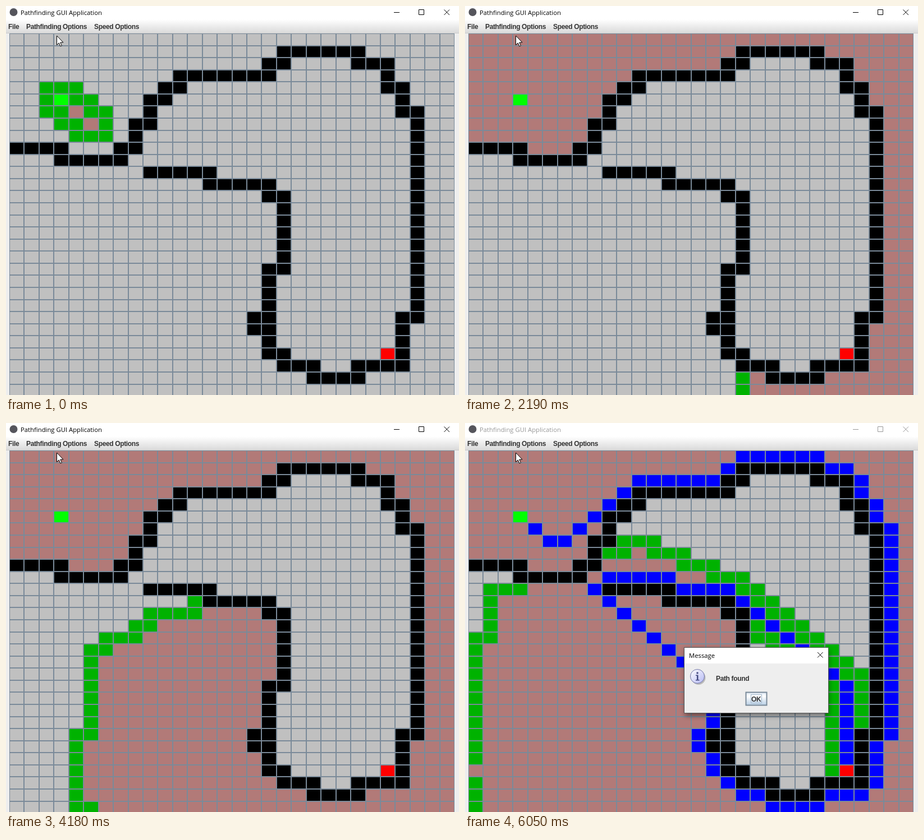
Animation of 807 by 694 pixels, one loop 6520 ms. Source, as an HTML page:

```html
<!DOCTYPE html>
<html lang="en">
<head>
<meta charset="utf-8">
<title>Pathfinding GUI Application</title>
<style>
html, body { margin: 0; width: 100%; height: 100%; overflow: hidden; background: #eee; }
svg { display: block; }
.caption { font: 11.3px "Open Sans", sans-serif; }
.label { font: bold 12px "Liberation Sans", Arial, sans-serif; letter-spacing: -.35px; fill: #333; }
.line { fill: none; stroke: currentColor; }
</style>
</head>
<body>
<svg width="807" height="694" viewBox="0 0 807 694">
  <defs>
    <linearGradient id="bar" x2="0" y2="1"><stop stop-color="#fff"/><stop offset="1" stop-color="#dadada"/></linearGradient>
    <linearGradient id="button" x2="0" y2="1"><stop stop-color="#dde8f3"/><stop offset=".3" stop-color="#fff"/><stop offset="1" stop-color="#b8cfe5"/></linearGradient>
    <linearGradient id="info" x2="1" y2="1"><stop stop-color="#fff"/><stop offset="1" stop-color="#b4b8f4"/></linearGradient>
    <filter id="soft" x="-20%" y="-20%" width="140%" height="150%"><feGaussianBlur stdDeviation="5"/></filter>
  </defs>

  <rect width="807" height="24" fill="#fff"/>
  <circle cx="13.500" cy="11" r="7" fill="#55555c"/>
  <g id="titlebar" color="#000">
    <text class="caption" x="26" y="16" fill="currentColor">Pathfinding GUI Application</text>
    <path class="line" d="M691 11.500h10M735.500 6.500h9v9h-9zM780.500 6.500l9.500 9.500m0-9.500l-9.500 9.500"/>
  </g>
  <rect y="24" width="807" height="24" fill="url(#bar)"/>
  <rect y="48" width="807" height="1" fill="#ccc"/>
  <g class="label">
    <text x="4" y="41">File</text>
    <text x="36" y="41">Pathfinding Options</text>
    <text x="157" y="41">Speed Options</text>
  </g>

  <rect x="6" y="49" width="793" height="645" fill="#7a8a99"/>
  <g id="grid" shape-rendering="crispEdges"></g>
  <path d="M90.500 53v16.500l3.800-3.600 2.600 6 2.500-1.100-2.600-5.800h5.200z" fill="#fff" stroke="#000"/>

  <g id="dialog" opacity="0">
    <rect x="392" y="404" width="256" height="118" opacity=".45" filter="url(#soft)"/>
    <rect x="390.500" y="400.500" width="257" height="117" fill="#eee" stroke="#555"/>
    <rect x="391" y="401" width="256" height="28" fill="#fff"/>
    <text class="caption" x="399" y="419">Message</text>
    <path class="line" d="M628 409l9.500 9.500m0-9.500l-9.500 9.500"/>
    <circle cx="416" cy="454.500" r="12.500" fill="#999" opacity=".6"/>
    <circle cx="414" cy="452" r="12.500" fill="url(#info)" stroke="#7377a8"/>
    <path d="M411 449.500h4.500v8.500h2v1.500h-6.500v-1.500h2v-7h-2zM412.500 444.500h3v3h-3z" fill="#444a80"/>
    <text class="label" x="447" y="459.500">Path found</text>
    <rect x="500.500" y="480.500" width="37" height="23" fill="url(#button)" stroke="#7a8a99" stroke-width="2"/>
    <rect x="509.500" y="484.500" width="19" height="15" fill="none" stroke="#a3b8cc"/>
    <text class="label" x="510" y="497">OK</text>
  </g>
</svg>
<script>
const SIZE = 30, LOOP = 6520, FOUND = 5740;
const START = 5 * SIZE + 3, GOAL = 26 * SIZE + 25;
const COLOR = { free: '#c0c0c0', wall: '#000', open: '#00b200', closed: '#b27a78', path: '#00f', start: '#0f0', goal: '#f00' };

// Wall column ranges, one entry per row
const WALLS = ['', '18-23', '17-18 23-25', '11-17 25', '10-11 25-26', '9-10 26', '9 26', '8-9', '8', '0-3 7-8',
  '3-7', '9-13', '13-17', '17-18', '18', '18', '18', '18', '18', '17-18', '17', '17', '17',
  '16-17 26', '16-17 26', '17 26', '17-18 26', '18-20 23-26', '20-23'];
const walls = new Set();
WALLS.forEach((row, r) => {
  if (r > 5 && r < 24) walls.add(r * SIZE + 27);
  for (const range of row.split(' ').filter(Boolean)) {
    const [a, b = a] = range.split('-').map(Number);
    for (let c = a; c <= b; c++) walls.add(r * SIZE + c);
  }
});

const col = i => i % SIZE, row = i => Math.floor(i / SIZE);
const toGoal = i => Math.hypot(col(i) - col(GOAL), row(i) - row(GOAL));

function neighbours(i) {
  const list = [];
  for (let dr = -1; dr <= 1; dr++) for (let dc = -1; dc <= 1; dc++) {
    const c = col(i) + dc, r = row(i) + dr, n = r * SIZE + c;
    if (n !== i && c >= 0 && r >= 0 && c < SIZE && r < SIZE && !walls.has(n)) list.push(n);
  }
  return list;
}

// A* with unit steps in eight directions; records the step at which each cell opens and closes
function search() {
  const cost = { [START]: 0 }, parent = {}, opened = {}, closed = {}, queue = [START];
  for (let step = 0; queue.length; step++) {
    let best = 0;
    const score = k => cost[queue[k]] + toGoal(queue[k]);
    for (let k = 1; k < queue.length; k++) if (score(k) < score(best)) best = k;
    const [cell] = queue.splice(best, 1);
    if (cell === GOAL) break;
    closed[cell] = step;
    for (const n of neighbours(cell)) {
      if (n in closed || cost[n] <= cost[cell] + 1) continue;
      if (!(n in cost)) {
        queue.push(n);
        opened[n] = step;
      }
      cost[n] = cost[cell] + 1;
      parent[n] = cell;
    }
  }
  const path = new Set();
  for (let i = parent[GOAL]; i !== undefined && i !== START; i = parent[i]) path.add(i);
  return { opened, closed, path };
}
const { opened, closed, path } = search();

const edgeX = c => Math.round(6 + 26.44 * c), edgeY = r => Math.round(49 + 21.57 * r);
const grid = document.getElementById('grid');
const cells = Array.from({ length: SIZE * SIZE }, (_, i) => {
  const rect = document.createElementNS('http://www.w3.org/2000/svg', 'rect');
  const x = edgeX(col(i)), y = edgeY(row(i));
  const box = { x: x + 1, y: y + 1, width: edgeX(col(i) + 1) - x - 2, height: edgeY(row(i) + 1) - y - 2 };
  for (const key in box) rect.setAttribute(key, box[key]);
  return grid.appendChild(rect);
});

// Repaint times: first, last, count
const times = [[0, 0, 1], [80, 710, 9], [790, 1410, 9], [1490, 2100, 9], [2190, 2820, 9], [2910, 3290, 6],
  [3370, 3540, 3], [3610, 4180, 8], [4240, 4240, 1], [4330, 4940, 9], [5020, 5500, 7], [5570, 5660, 2], [FOUND, 6050, 5]]
  .flatMap(([a, b, n]) => Array.from({ length: n }, (_, k) => n > 1 ? a + (b - a) * k / (n - 1) : a));

// Search progress: time, steps done
const PACE = [[0, 2], [1410, 135], [2190, 208], [3290, 312], [4180, 393], [5500, 518], [5660, 534], [LOOP, 534]];
function stepsAt(t) {
  const k = PACE.findIndex(p => p[0] > t);
  const [t0, n0] = PACE[k - 1], [t1, n1] = PACE[k];
  return Math.round(n0 + (n1 - n0) * (t - t0) / (t1 - t0));
}

function colorOf(i, step, done) {
  if (i === START) return COLOR.start;
  if (i === GOAL) return COLOR.goal;
  if (walls.has(i)) return COLOR.wall;
  if (done && path.has(i)) return COLOR.path;
  if (closed[i] <= step) return COLOR.closed;
  return opened[i] <= step ? COLOR.open : COLOR.free;
}

const titlebar = document.getElementById('titlebar'), dialog = document.getElementById('dialog');
function paint(t) {
  const done = t >= FOUND, step = stepsAt(t);
  cells.forEach((cell, i) => cell.setAttribute('fill', colorOf(i, step, done)));
  titlebar.setAttribute('color', done ? '#999' : '#000');
  const p = done ? Math.min(1, (t - FOUND + 78) / 388) : 0;
  const ease = 1 - (1 - p) ** 2, scale = 0.92 + 0.08 * ease;
  dialog.setAttribute('opacity', ease);
  dialog.setAttribute('transform', `translate(519 459) scale(${scale}) translate(-519 -459)`);
}

const begin = performance.now();
let shown = -1;
function tick() {
  const t = (performance.now() - begin) % LOOP;
  const index = times.filter(s => s <= t).length - 1;
  if (index !== shown) paint(times[shown = index]);
  requestAnimationFrame(tick);
}
tick();
</script>
</body>
</html>
```
